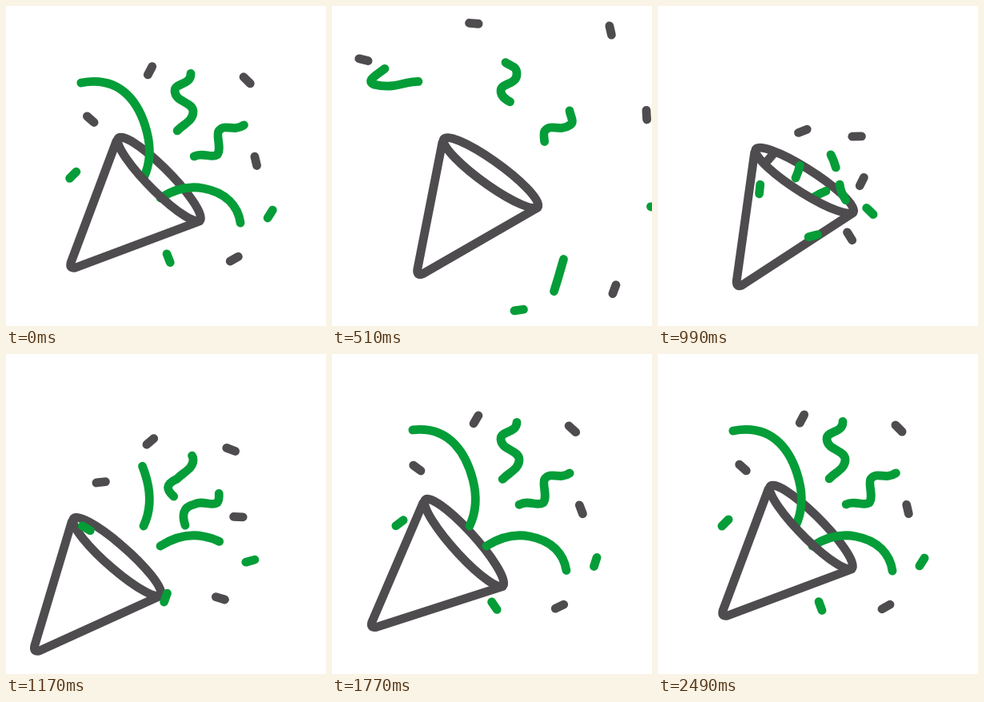
Recreate the animation shown at these times as an HTML page. Size 400 by 400 pixels, loop 2520 ms.

```html
<!DOCTYPE html>
<html>
<head>
<meta charset="utf-8">
<style>
  html, body { margin: 0; width: 100%; height: 100%; overflow: hidden; background: #fff; }
  svg { display: block; width: 100vw; height: 100vh; }
  path { fill: none; stroke-width: 10.8; stroke-linecap: round; stroke-linejoin: round; }
  .dark { stroke: #4e4c4e; }
  .green { stroke: #049d38; }
</style>
</head>
<body>
<svg viewBox="0 0 400 400">
  <g class="cone">
    <path class="dark" d="M138 169L81 321Q79 329 87 327L242 269"/>
    <path class="dark" d="M140 166A72 14.5 45.3 0 1 243 267"/>
  </g>
  <g id="streamers"></g>
  <g class="cone">
    <path class="dark" d="M140 166A72 14.5 45.3 0 0 243 267"/>
  </g>
  <g id="confetti"></g>
</svg>
<script>
const LOOP = 2520, BURST = 920, FLIGHT = 960;
const ORIGIN = [182, 252];

const clamp = v => Math.min(1, Math.max(0, v));
const span = (t, from, to) => clamp((t - from) / (to - from));
const smooth = u => u * u * (3 - 2 * u);
const easeOut = (u, k) => 1 - (1 - u) ** k;

function addPath(parent, color, d) {
  const path = document.createElementNS('http://www.w3.org/2000/svg', 'path');
  path.setAttribute('class', color);
  path.setAttribute('d', d);
  document.getElementById(parent).append(path);
  return path;
}

// Each streamer is a window sliding along lead-in, resting part and exit.
const streamers = [
  { intro: 'M172 215',
    rest: 'C179 200 182 180 176 157C168 126 147 86 94 96',
    exit: 'C78 100 68 102 52 98C40 92 62 84 73 72C82 62 78 50 66 42C60 38 54 30 50 24',
    leave: 900, power: 1.2, k: 3 },
  { intro: 'M193 240',
    rest: 'C215 226 232 225 247 228C275 233 290 250 293 271',
    exit: 'C298 300 290 312 287 325C280 350 272 375 262 398',
    leave: 700, power: 1.3, k: 5 },
  { intro: 'M224 210C222 198 218 188 213 181C202 172 196 164 214 156',
    rest: 'C221 148 234 144 234 132C234 120 211 120 211 106C211 96 231 99 231 85',
    exit: 'C231 76 226 76 219 72C207 64 207 57 218 50C226 44 233 40 233 32',
    leave: 900, power: 2.2, k: 5 },
  { intro: 'M240 250C232 240 228 232 227 222C220 206 218 192 235 188',
    rest: 'C246 182 256 191 264 186C270 178 262 162 266 156C274 146 284 158 297 149',
    exit: 'C304 146 298 138 297 131C295 118 298 114 311 115C320 116 324 112 326 104',
    leave: 900, power: 2.2, k: 6 }
].map(s => {
  const path = addPath('streamers', 'green', s.intro);
  const measure = d => { path.setAttribute('d', d); return path.getTotalLength(); };
  const start = measure(s.intro);
  const end = measure(s.intro + s.rest);
  const total = measure(s.intro + s.rest + s.exit);
  return { ...s, path, start, end, total };
});

// color, x, y, angle, flight dx, dy, spin, ease power, burst spin
const confetti = [
  ['dark', 106, 142, 42, -73, -82, -228, 3.2, -156],
  ['dark', 180, 81, -62, -3, -66, -126, 3, 69],
  ['dark', 301, 93, 45, 58, -77, -182, 2.2, -78],
  ['dark', 312, 194, 77, 104, -74, -218, 2, -240],
  ['dark', 285, 316, -30, 73, 41, 151, 3.5, 150],
  ['green', 84, 211, -45, -127, 127, 190, 2, 240],
  ['green', 203, 315, 70, 33, 70, -278, 3.5, -450],
  ['green', 330, 260, -58, 95, -11, 82, 2, -440]
].map(([color, x, y, angle, dx, dy, spin, k, burstSpin]) =>
  ({ path: addPath('confetti', color, 'M-5.8 0H5.8'), x, y, angle, dx, dy, spin, k, burstSpin }));

const cones = document.querySelectorAll('.cone');

function drawCone(t) {
  const angle = t < 870 ? -15 * smooth(span(t, 0, 870))
    : t < 1430 ? -15 + 20 * smooth(span(t, 870, 1430))
    : 5 * (1 - smooth(span(t, 1430, 2300) ** 0.8));
  const recoil = t < 1200 ? smooth(span(t, 870, 1200))
    : 1 - smooth(span(t, 1200, 2490) ** 0.73);
  for (const cone of cones) {
    cone.setAttribute('transform',
      `translate(${-57 * recoil} ${41 * recoil}) rotate(${angle} 147 170)`);
  }
}

function drawStreamer(s, t) {
  let tail, lead;
  if (t < 950) {
    const p = span(t, 0, s.leave) ** s.power;
    tail = s.start + (s.total - s.start) * p;
    lead = s.end + (s.total - s.end) * p;
  } else {
    const u = span(t, 950, 2200);
    tail = s.start * easeOut(u, 4);
    lead = s.end * easeOut(u, s.k);
  }
  const length = lead - tail;
  s.path.style.display = length < 1 ? 'none' : '';
  s.path.style.strokeDasharray = `${Math.max(1, length)} 9999`;
  s.path.style.strokeDashoffset = -tail;
}

function drawConfetti(c, t) {
  let { x, y, angle } = c;
  if (t < BURST) {
    const p = easeOut(t / FLIGHT, c.k);
    x += c.dx * p;
    y += c.dy * p;
    angle += c.spin * p;
  } else {
    const left = (1 - Math.sqrt(span(t, BURST, 2160))) ** 3;
    x += (ORIGIN[0] - x) * left;
    y += (ORIGIN[1] - y) * left;
    angle += c.burstSpin * left ** 0.65;
  }
  c.path.setAttribute('transform', `translate(${x} ${y}) rotate(${angle})`);
}

function draw() {
  const t = performance.now() % LOOP;
  drawCone(t);
  streamers.forEach(s => drawStreamer(s, t));
  confetti.forEach(c => drawConfetti(c, t));
  requestAnimationFrame(draw);
}
draw();
</script>
</body>
</html>
```
